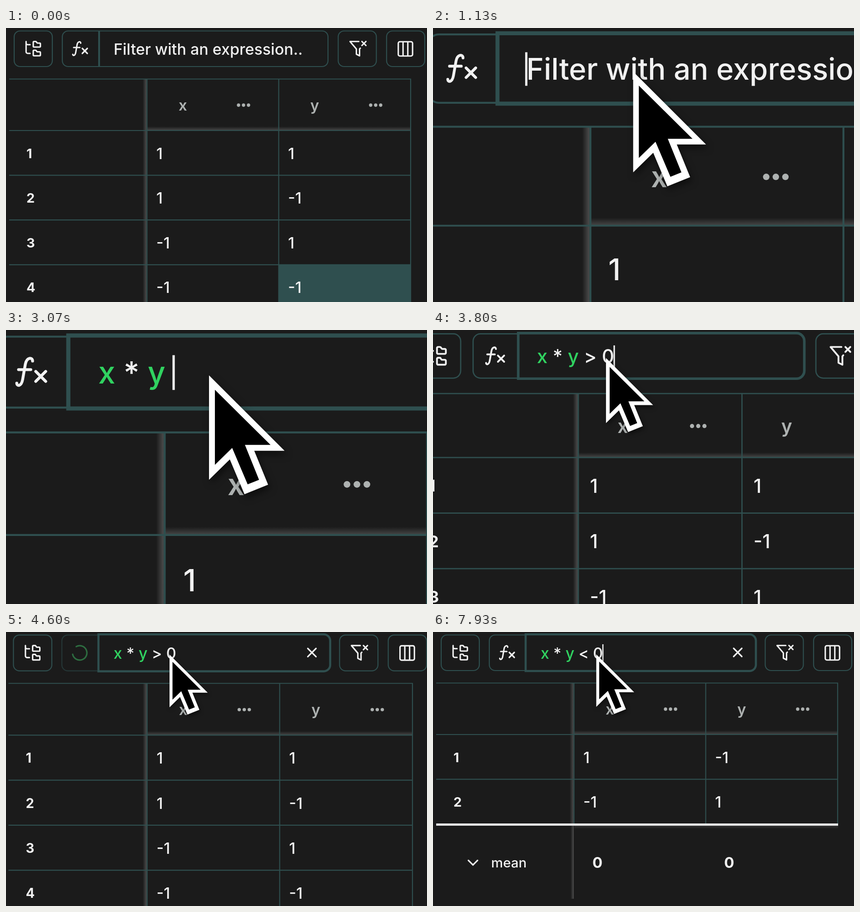
Recreate the animation shown at these times as an HTML page. Size 927x604 px, loop 8000 ms.

```html
<!DOCTYPE html>
<html lang="en">
<head>
<meta charset="utf-8">
<title>Table filter</title>
<style>
  html, body { margin: 0; width: 100%; height: 100%; overflow: hidden; background: #1b1b1b; }
  svg { display: block; width: 100vw; height: 100vh; }
  text { font: 500 34px Inter, "Open Sans", sans-serif; fill: #f1f1f1; white-space: pre; }
  .head { font-weight: 600; font-size: 33px; fill: #aeb2b1; }
  .index { font-weight: 700; font-size: 29px; }
  .mean { font-size: 29.5px; }
  .total { font-weight: 700; font-size: 33px; }
  .var { fill: #30d260; }
  .line, .icon { fill: none; stroke-linecap: round; stroke-linejoin: round; }
  .line { stroke: #2f4f4f; stroke-width: 2.2; stroke-linecap: butt; }
  .icon { stroke: #f1f1f1; stroke-width: 1.8; }
  .glyph { stroke-width: 3.2; }
  .dots { fill: #aeb2b1; }
  #cursor { filter: drop-shadow(2px 4px 4px rgba(0, 0, 0, .5)); }
</style>
</head>
<body>
<svg viewBox="0 0 927 604" preserveAspectRatio="none">
  <defs>
    <linearGradient id="shadeX"><stop offset="0" stop-color="#555" stop-opacity="0"/><stop offset="1" stop-color="#555" stop-opacity=".85"/></linearGradient>
    <linearGradient id="shadeY" x2="0" y2="1"><stop offset="0" stop-color="#555" stop-opacity="0"/><stop offset="1" stop-color="#555" stop-opacity=".75"/></linearGradient>
    <linearGradient id="shadeFoot" x2="0" y2="1"><stop offset="0" stop-color="#555" stop-opacity=".5"/><stop offset="1" stop-color="#555" stop-opacity="0"/></linearGradient>
  </defs>
  <g id="world">
    <g id="tables"></g>

    <g class="line">
      <rect x="18" y="6.5" width="84" height="78.5" rx="13"/>
      <rect x="731.5" y="6.5" width="84" height="78.5" rx="13"/>
      <rect x="838" y="6.5" width="84" height="78.5" rx="13"/>
      <path id="fxBorder" d="M205 6.5H137a13 13 0 0 0-13 13V72a13 13 0 0 0 13 13H205"/>
      <path id="idleField" d="M205 6.5H696a13 13 0 0 1 13 13V72a13 13 0 0 1-13 13H205"/>
      <path id="idleSplit" d="M205 6V85.5" stroke-width="4"/>
      <path id="focusField" d="M204 5.2H697a14 14 0 0 1 14 14V72a14 14 0 0 1-14 14H204Z" style="stroke-width:4.6;stroke-linejoin:miter"/>
    </g>

    <g class="icon">
      <path transform="translate(39 24.5) scale(1.75)" d="M20 10a1 1 0 0 0 1-1V6a1 1 0 0 0-1-1h-2.5a1 1 0 0 1-.8-.4l-.9-1.2A1 1 0 0 0 15 3h-2a1 1 0 0 0-1 1v5a1 1 0 0 0 1 1ZM20 21a1 1 0 0 0 1-1v-3a1 1 0 0 0-1-1h-2.9a1 1 0 0 1-.88-.55l-.42-.85a1 1 0 0 0-.92-.6H13a1 1 0 0 0-1 1v5a1 1 0 0 0 1 1ZM3 5a2 2 0 0 0 2 2h3M3 3v13a2 2 0 0 0 2 2h3"/>
      <path transform="translate(754 24.5) scale(1.75)" d="M13 3H2l8 9.46V19l4 2v-8.54l.9-1.05M22 3l-5 5M17 3l5 5"/>
      <path transform="translate(858.5 25) scale(1.75)" d="M5 3h14a2 2 0 0 1 2 2v14a2 2 0 0 1-2 2H5a2 2 0 0 1-2-2V5a2 2 0 0 1 2-2ZM9 3v18M15 3v18"/>
      <path id="fx" class="glyph" d="M164.500 33.5C164.500 29 158 29 156.500 37L153.500 54C152 62 147 61.500 147 58M149 43H162.500M168 45L179 56M179 45L168 56"/>
      <path id="clear" class="glyph" d="M662 36l18 18M680 36l-18 18"/>
    </g>
    <path id="spinner" class="icon" d="M15.750 0A15.750 15.750 0 1 1 4.870-14.980" style="stroke:#2d6d40;stroke-width:3.2"/>

    <text id="query" x="237" y="58.500"></text>
    <rect id="caret" y="27" width="2.600" height="38.500" fill="#f1f1f1"/>

    <g id="cursor">
      <path fill="#fff" d="M0 0L83.500 83.500H50L65.300 121 39.200 131.500 23 93 0 115.600Z"/>
      <path d="M6.500 16L68 77H39.700L55.300 115.600 42.700 120.600 25.600 80.400 6.500 99Z"/>
    </g>
  </g>
</svg>
<script>
const $ = id => document.getElementById(id);
const LOOP = 8000;
const FOCUS = { x: 271.3, y: -1.7 };
const ZOOM = 0.992;
const PLACEHOLDER = "Filter with an expression..";

const text = (x, y, value, cls = "") => `<text x="${x}" y="${y}" class="${cls}">${value}</text>`;
const line = d => `<path class="line" d="${d}"/>`;
const dots = x => [-11, 0, 11].map(dx => `<circle class="dots" cx="${x + dx}" cy="170" r="3.7"/>`).join("");

function table(rows, filtered) {
  const rowY = i => 226 + 98.6 * i;
  const bottom = filtered ? 424 : rowY(rows.length);
  let s = `<rect x="301" y="113" width="8.500" height="${bottom - 113}" fill="url(#shadeX)"/>
    <rect x="311" y="217" width="580" height="9" fill="url(#shadeY)"/>`;
  if (!filtered) s += `<rect id="selected" x="600" y="521" width="291" height="99" fill="#2f4f4f"/>`;
  s += line(`M7 112.500H892M7 226H892M310.500 112V${bottom}M600.500 112V${bottom}M891 112V${bottom}`);
  s += text(380, 182, "x", "head") + text(670, 182, "y", "head") + dots(523) + dots(814);
  rows.forEach(([x, y], i) => {
    const base = 288.5 + 98.6 * i;
    if (i) s += line(`M7 ${rowY(i)}H892`);
    s += text(45, base - 2, i + 1, "index") + text(331, base, x) + text(621, base, y);
  });
  if (filtered) {
    s += `<rect x="303" y="426" width="7" height="162" fill="url(#shadeX)"/>
      <rect x="311" y="426" width="581" height="8" fill="url(#shadeFoot)"/>
      <rect x="7" y="422" width="885" height="5" fill="#e6e6e6"/>
      <path class="icon glyph" d="M78 503.500L88 513.500 98 503.500"/>`;
    s += text(128, 518.5, "mean", "mean") + text(351, 520, "0", "total") + text(641, 520, "0", "total");
  }
  return `<g>${s}</g>`;
}

$("tables").innerHTML =
  table([[1, 1], [1, -1], [-1, 1], [-1, -1]], false) +
  table([[1, 1], [-1, -1]], true) +
  table([[1, -1], [-1, 1]], true);
const tables = [...$("tables").children];

// [time, content, caret index]
const edits = [
  [0, "", 0],
  [1430, "x", 1], [1670, "x ", 2], [1930, "x *", 3], [2130, "x * ", 4], [2430, "x * y", 5],
  [2760, "x * y ", 6], [3270, "x * y >", 7], [3400, "x * y > ", 8], [3600, "x * y > 0", 9],
  [5370, "x * y > 0", 8], [5500, "x * y > 0", 7],
  [6070, "x * y  0", 6], [6400, "x * y < 0", 7],
  [6830, "x * y < 0", 8], [6930, "x * y < 0", 9]
];

const measure = document.createElement("canvas").getContext("2d");
const show = (el, on) => { el.style.display = on ? "" : "none"; };
const within = (t, a, b) => t >= a && t < b;

// Step response of a slightly underdamped spring, t in ms
function spring(t) {
  if (t <= 0) return 0;
  const zeta = 0.89, u = t * 0.0034, d = Math.sqrt(1 - zeta * zeta);
  return 1 - Math.exp(-zeta * u) * (Math.cos(d * u) + zeta / d * Math.sin(d * u));
}

const smooth = (t, a, b) => {
  const p = Math.min(1, Math.max(0, (t - a) / (b - a)));
  return p * p * (3 - 2 * p);
};

let shownQuery = null;
function setQuery(value) {
  if (value === shownQuery) return;
  shownQuery = value;
  $("query").innerHTML = value
    ? value.replace("<", "&lt;").replace(/[xy]/g, v => `<tspan class="var">${v}</tspan>`)
    : PLACEHOLDER;
}

function draw(t) {
  const scale = 1 + ZOOM * (spring(t - 55) - spring(t - 3075));
  $("world").setAttribute("transform",
    `translate(${FOCUS.x * (1 - scale)} ${FOCUS.y * (1 - scale)}) scale(${scale})`);

  const focused = t >= 930;
  const loading = within(t, 4420, 5000) || within(t, 7060, 7470);
  show($("idleField"), !focused);
  show($("idleSplit"), !focused);
  show($("focusField"), focused);
  show($("fx"), !loading);
  show($("spinner"), loading);
  show($("clear"), t >= 4420);
  $("fxBorder").style.opacity = loading ? 0.55 : 1;
  $("spinner").setAttribute("transform", `translate(163 45.700) rotate(${241 + (t - 4600) * 0.36})`);

  const stage = t < 5000 ? 0 : t < 7470 ? 1 : 2;
  tables.forEach((el, i) => show(el, i === stage));
  show($("selected"), t < 250);

  const [, value, index] = edits.findLast(e => e[0] <= t);
  setQuery(value);
  measure.font = '500 34px Inter, "Open Sans", sans-serif';
  $("caret").setAttribute("x", 235.7 + measure.measureText(value.slice(0, index)).width);
  show($("caret"), focused && !loading);

  const p = smooth(t, 40, 780);
  $("cursor").setAttribute("transform",
    `translate(${750 + (359.5 - 750) * p} ${615 + (49.3 - 615) * p})`);
}

let start;
function tick(now) {
  start ??= now;
  draw((now - start) % LOOP);
  requestAnimationFrame(tick);
}
draw(0);
requestAnimationFrame(tick);
</script>
</body>
</html>
```
